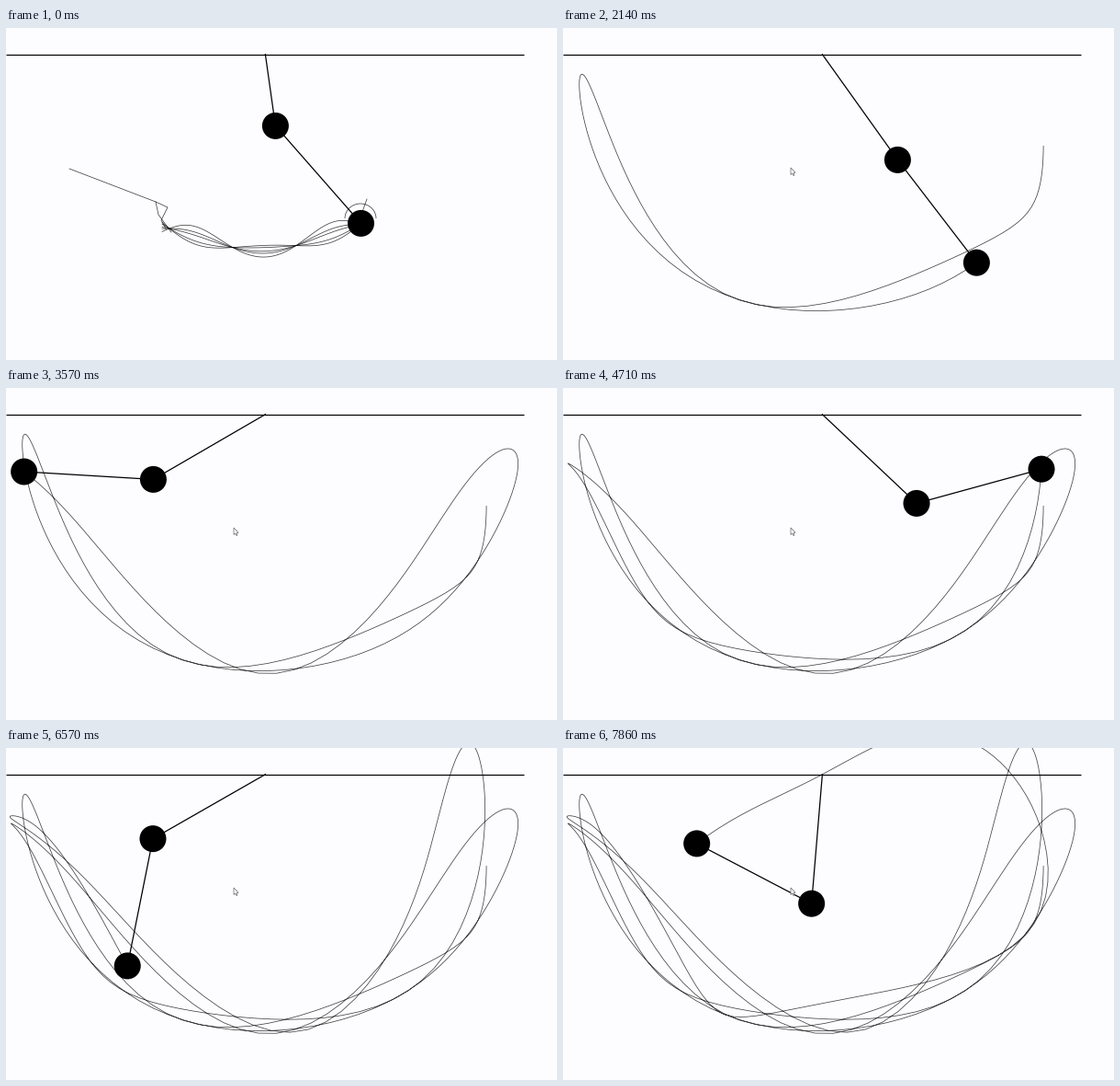
These frames come from a looping animation (600x361 px, 8000 ms). A matplotlib script:

```python
import math

import numpy as np
import matplotlib.pyplot as plt
from matplotlib.animation import FuncAnimation
from matplotlib.patches import Arc, Circle, Polygon

W, H, DPI = 600, 361, 100
LOOP_MS, TICK_MS = 8000, 20
FPS = 7                          # the picture advances seven times a second
STEPS = 60 / FPS                 # pendulum steps per picture
RESTART = 2                      # picture in which the second run begins
START = 1.12                     # release of the second run, in pictures

PIVOT = np.array([282.4, 28.7])
ROD, BOB = 141.0, 14.5           # pixels
UNITS = 250                      # rod length in simulation units
INK = dict(color="black", alpha=0.75, lw=0.54, zorder=1)


def px(width):
    return width * 72 / DPI


def swing(steps):
    """Angles of a double pendulum, equal rods and bobs, unit gravity."""
    a1, a2, w1, w2 = math.pi / 2, math.pi / 4, 0.0, 0.0
    g = 1 / UNITS
    out = [(a1, a2)]
    for _ in range(steps):
        d = a1 - a2
        s, c = math.sin(d), math.cos(d)
        den = 3 - math.cos(2 * d)
        acc1 = (-3 * g * math.sin(a1) - g * math.sin(a1 - 2 * a2)
                - 2 * s * (w2 * w2 + w1 * w1 * c)) / den
        acc2 = 2 * s * (2 * w1 * w1 + 2 * g * math.cos(a1)
                        + w2 * w2 * c) / den
        w1 += acc1
        w2 += acc2
        a1 += w1
        a2 += w2
        out.append((a1, a2))
    return np.array(out)


def bobs(angles):
    """Stage positions of both bobs for every step."""
    arm = ROD * np.stack([np.sin(angles), np.cos(angles)], axis=-1)
    return PIVOT + np.cumsum(arm, axis=1)


def strand(amp):
    """One pass of the first run: a shallow arc with a wobble."""
    u = np.linspace(0, 1, 80)
    arc = 215 + 26 * np.sin(math.pi * u)
    fade = 1 - 0.55 * np.sin(math.pi * u)
    wobble = amp * fade * np.cos(2 * math.pi * (u - 0.2) / 0.65)
    return 170 + 212 * u, arc + wobble


TRACK = bobs(swing(math.ceil(LOOP_MS / 1000 * FPS * STEPS)))
FIRST_POSE = np.array([(293.4, 106.4), (386.5, 212.4)])

fig = plt.figure(figsize=(W / DPI, H / DPI), dpi=DPI, facecolor="#fdfcfe")
ax = fig.add_axes([0, 0, 1, 1])
ax.set_xlim(0, W)
ax.set_ylim(H, 0)
ax.axis("off")

ax.plot([0, 564], [PIVOT[1]] * 2, color="black", lw=px(1.2),
        solid_capstyle="butt", zorder=2)

# Scribble left by the first run
scribble = [ax.plot(*strand(amp), **INK)[0] for amp in (-18, -9, -4, 5, 10)]
for ends in ([(69, 153), (163, 189), (176, 195), (169, 209), (174, 218)],
             [(163, 189), (166, 203), (180, 222)],
             [(393, 186), (388, 200)]):
    scribble += ax.plot(*zip(*ends), **INK)
scribble.append(ax.add_patch(Arc((386, 207), 34, 32, theta1=180, theta2=360,
                                 **INK)))

trail, = ax.plot([], [], **INK)
rods, = ax.plot([], [], color="black", lw=px(1.25), zorder=3)
balls = [ax.add_patch(Circle((0, 0), BOB, fc="black", ec="none", zorder=4))
         for _ in range(2)]
cursor = ax.add_patch(Polygon(
    [(248, 152), (248, 159.5), (249.7, 158), (250.9, 160.5), (252, 160),
     (251, 157.6), (253, 157.2)],
    fc="white", ec="#666666", lw=px(0.7), zorder=5))


def draw(tick):
    # The small lead lets a change fall on the tick before it is due
    picture = int(tick * TICK_MS * FPS / 1000 + 0.13)
    first_run = picture < RESTART
    step = 0 if first_run else round((picture - START) * STEPS)
    pose = FIRST_POSE if first_run else TRACK[step]

    trail.set_data(*TRACK[:step + 1, 1].T)
    trail.set_visible(not first_run)
    cursor.set_visible(not first_run)
    for line in scribble:
        line.set_visible(first_run)
    rods.set_data(*np.vstack([PIVOT, pose]).T)
    for ball, centre in zip(balls, pose):
        ball.center = centre
    return [trail, rods, cursor, *balls, *scribble]


anim = FuncAnimation(fig, draw, frames=LOOP_MS // TICK_MS, interval=TICK_MS,
                     repeat=True, repeat_delay=0, blit=False)
plt.show()
```
